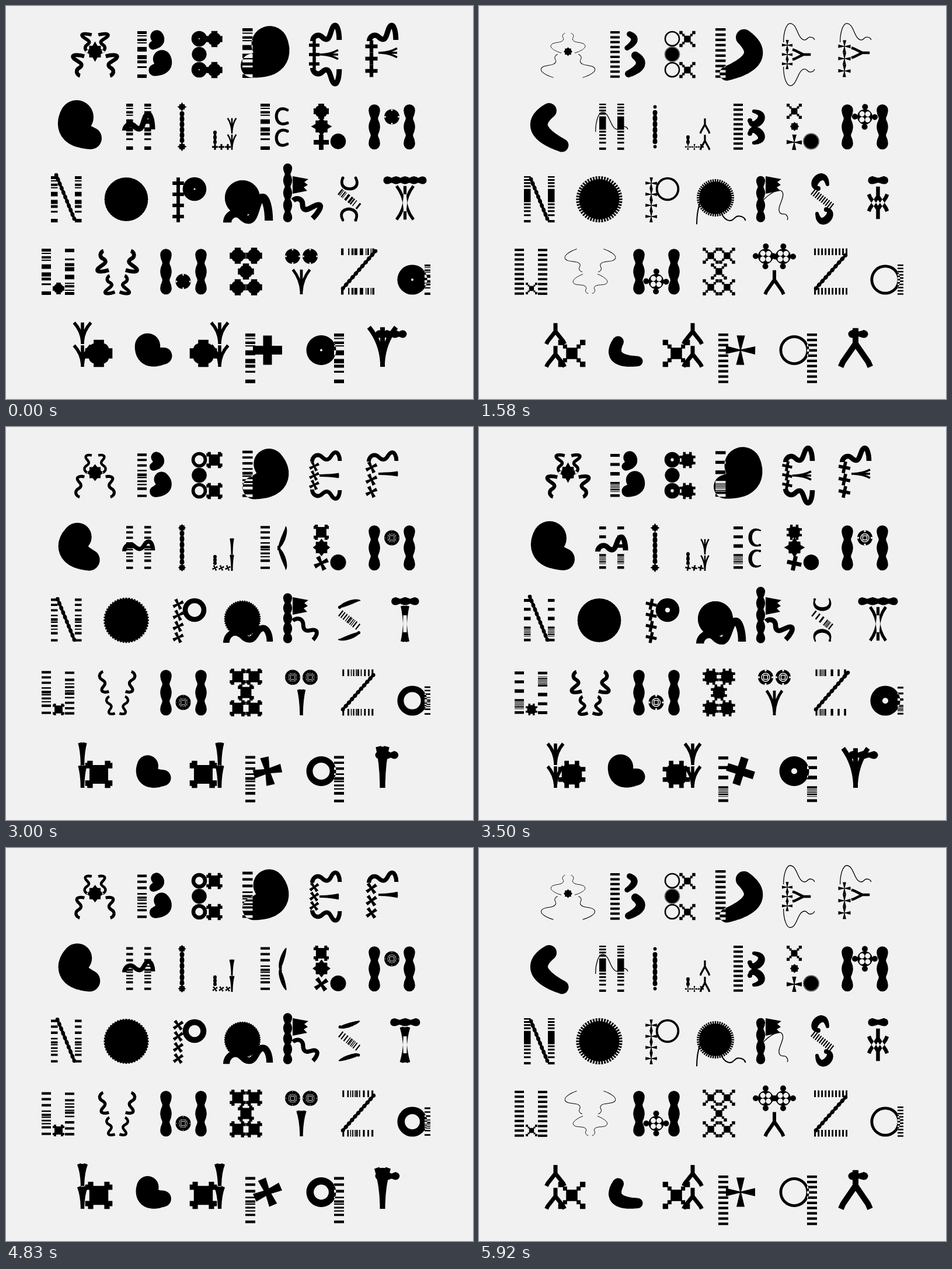
An HTML page with a canvas for the animation above (6 s loop, 800 px wide and 672 px high).

```html
<!DOCTYPE html>
<html lang="en">
<head>
<meta charset="utf-8">
<title>Morphing alphabet</title>
<style>
html, body { margin: 0; width: 100%; height: 100%; overflow: hidden; background: #f1f1f1; }
canvas { display: block; }
</style>
</head>
<body>
<canvas id="stage" width="800" height="672"></canvas>
<script>
const c = document.getElementById('stage').getContext('2d');
const PAPER = '#f1f1f1', TAU = Math.PI * 2;
const mix = (a, b, k) => a + (b - a) * k;

// Position along the five master poses, as [ms, pose].
const PATH = [[0, 0], [200, 1], [833, 2], [1160, 3], [1500, 4], [1790, 4.1], [2090, 4], [2420, 3],
  [2750, 2], [3500, 1], [3833, 0], [4167, 0], [4333, 1], [5250, 2], [5580, 3], [5917, 4], [6000, 4.1]];
let pose = 0;

function poseAt(t) {
  const i = PATH.findIndex(p => p[0] > t), [t0, a] = PATH[i - 1], [t1, b] = PATH[i];
  return mix(a, b, (t - t0) / (t1 - t0));
}
// Value of a five-master list at the current pose.
function v(list) {
  const i = Math.min(3, Math.floor(pose));
  return mix(list[i], list[i + 1], pose - i);
}
function at(x, y, s, deg, draw, flipX = 1, flipY = 1) {
  c.save();
  c.translate(x, y);
  c.scale(flipX * s, flipY * s);
  c.rotate(deg * Math.PI / 180);
  draw();
  c.restore();
}
function xor(draw) {
  c.globalCompositeOperation = 'xor';
  draw();
  c.globalCompositeOperation = 'source-over';
}
function dot(x, y, r) {
  c.moveTo(x + r, y);
  c.arc(x, y, Math.max(0, r), 0, TAU);
}
function disc(x, y, r, color = '#000') {
  c.fillStyle = color;
  c.beginPath();
  dot(x, y, r);
  c.fill();
  c.fillStyle = '#000';
}

// Barcodes, 80 units long: starts and widths.
const EVEN = [[0, 8.4, 16.8, 25.2, 33.6, 42, 50.4, 58.8, 67.2, 75.8], Array(10).fill(4)];
const BLOCK = [[0, 5, 10.5, 16, 22, 47, 53, 59, 66, 76], [2.5, 3, 3, 3, 23, 3, 3, 3, 3, 4]];
const LOOSE = [
  [[0, 7, 13, 19, 27, 33, 41, 50, 60, 74], [5, 2, 4, 2, 6, 2, 7, 5, 3, 6]],
  [[3, 18.5, 34, 51, 55.5, 58, 60.5, 63, 67, 72], [5, 5, 6, 3.5, 1.3, 1.3, 1.3, 2.5, 1, 4.5]],
  [[2, 8, 14, 20, 27, 34, 42, 50, 57, 73], [4, 3, 3, 2, 6, 3, 4, 2, 6, 4]]];
function bars(x, y, w, h, end = EVEN, deg = 0) {
  const set = [...LOOSE, end, end];
  at(x, y, 1, deg, () => {
    c.beginPath();
    for (let i = 0; i < 10; i++) {
      const a = v(set.map(p => p[0][i])), b = v(set.map(p => p[1][i]));
      c.rect(0, a * h / 80, w, b * h / 80);
    }
    c.fill();
  });
}

// Snake with two crests; baseline at y = 0, 54 units long.
function wave() {
  const w = v([9, 8.5, 6, 3, 1.3]), x0 = w / 2, x4 = 54.3 - w / 2,
    y0 = v([2, 2, 1, 2, 4]), y4 = 0,
    x1 = v([14, 14, 13, 11, 12]), y1 = v([-8, -8, -11, -20, -28]),
    x2 = v([28, 28, 29, 33, 37]), y2 = v([-1, -1, -3, -1, 0]),
    x3 = v([43, 43, 44, 45, 46]), y3 = v([-25, -22, -11, -6, -5]);
  const a = (x1 + x2) / 2, b = (x2 + x3) / 2;
  c.lineWidth = w;
  c.beginPath();
  c.moveTo(x0, y0);
  c.bezierCurveTo(x0, mix(y0, y1, .55), mix(x1, x0, .55), y1, x1, y1);
  c.bezierCurveTo(a, y1, a, y2, x2, y2);
  c.bezierCurveTo(b, y2, b, y3, x3, y3);
  c.bezierCurveTo(mix(x3, x4, .55), y3, x4, mix(y4, y3, .55), x4, y4);
  c.stroke();
}

// Kidney: union of circles swept along a curve.
function bean() {
  const p0 = [v([-6, -6, -4, -5, -7]), v([-14, -14, -17, -21, -25])],
    p1 = [v([-8.5, -8.5, -12, -19, -23]), v([8, 8, 6, 5, 5])],
    p2 = [v([18, 18, 14, 15, 15]), v([22, 22, 24, 30, 34])],
    r0 = v([29, 29, 22, 16, 13]), r1 = v([25, 25, 24, 18, 15]), r2 = v([19, 19, 18, 14, 11.5]);
  const bend = (a, m, b, k) => (1 - k) * (1 - 2 * k) * a + 4 * k * (1 - k) * m + k * (2 * k - 1) * b;
  c.beginPath();
  for (let k = 0; k <= 1.001; k += 1 / 60)
    dot(bend(p0[0], p1[0], p2[0], k), bend(p0[1], p1[1], p2[1], k), bend(r0, r1, r2, k));
  c.fill();
}

function gear(x, y, r) {
  disc(x, y, r * v([.94, .94, .94, .9, .87]));
  const out = r * v([.94, .94, 1, 1, 1]), inner = r * .83, n = 48;
  c.beginPath();
  for (let i = 0; i < n; i++) {
    const a = i * TAU / n, half = TAU / n * .3;
    for (const [q, d] of [[inner, -half], [out, -half], [out, half], [inner, half]])
      c[q === inner && d < 0 ? 'moveTo' : 'lineTo'](x + q * Math.cos(a + d), y + q * Math.sin(a + d));
  }
  c.fill();
}

function ring(x, y, r) {
  const hole = r * v([.08, .2, .76, .79, .81]);
  c.beginPath();
  dot(x, y, r);
  dot(x, y, hole);
  c.fill('evenodd');
}

// Square cog: the pair of teeth on each side slides apart into the corners.
function cog(x, y, s) {
  at(x, y, s, 0, () => {
    const b = v([.74, .74, .66, .5, .42]), k = v([.4, .33, .44, .42, .4]),
      o = v([.18, .38, .78, .79, .8]), link = v([0, 0, 0, .34, .3]);
    c.beginPath();
    c.roundRect(-b, -b, 2 * b, 2 * b, Math.max(0, v([.45, .45, 0, 0, 0])));
    for (const i of [-1, 1]) for (const j of [-1, 1]) {
      const m = 1 - k / 2;
      c.rect(i * o - k / 2, j * m - k / 2, k, k);
      c.rect(i * m - k / 2, j * o - k / 2, k, k);
      c.rect(i * .5 - link / 2, j * .5 - link / 2, link, link);
    }
    c.fill();
  });
}

function star(x, y, s) {
  const r = s * v([1, 1, .74, .48, .43]), diagonal = v([.8, .78, 1, 1, 1]), inner = v([.62, .62, .76, .76, .76]);
  c.beginPath();
  for (let i = 0; i < 16; i++) {
    const a = i * TAU / 16, q = r * (i % 2 ? inner : i % 4 ? diagonal : 1);
    c.lineTo(x + q * Math.cos(a), y + q * Math.sin(a));
  }
  c.fill();
}

function cross(x, y, s, extra = 0) {
  const deg = v([0, 12 + extra / 3, 90 + extra, 135, 180]);
  at(x, y, s * v([1, .96, .97, .8, 1]), deg, () => {
    const a = v([.3, .28, .14, .12, .05]), o = v([.3, .28, .32, .27, .28]);
    c.beginPath();
    for (let i = 0; i < 4; i++) {
      c.moveTo(0, -a);
      c.lineTo(a, -a);
      c.lineTo(1, -o);
      c.lineTo(1, o);
      c.lineTo(a, a);
      c.lineTo(0, a);
      c.rotate(TAU / 4);
    }
    c.rect(-a, -a, 2 * a, 2 * a);
    c.fill();
  });
}

function chain(x0, y0, x1, y1, r) {
  const len = Math.hypot(x1 - x0, y1 - y0), n = Math.max(1, Math.round(len / r / 2.5));
  c.beginPath();
  for (let i = 0; i <= 120; i++) {
    const k = i / 120;
    dot(mix(x0, x1, k), mix(y0, y1, k), r * (.82 + .18 * Math.cos(k * n * TAU)));
  }
  c.fill();
}

// Stick that branches at its tip or splits into legs at its base.
function tree(x, y, len, w, spread = 1, deg = 0) {
  at(x, y, 1, deg, () => {
    const tip = -len * v([.94, .94, 1, .95, .92]), up = len * spread * v([.37, .34, 0, 0, 0]),
      legs = len * spread * v([0, 0, 0, .24, .4]);
    c.lineWidth = w * v([.8, .8, 1, 1, 1]);
    c.beginPath();
    c.moveTo(0, legs > .3 ? -len * .5 : 0);
    c.lineTo(0, tip);
    for (const i of [-1, 1]) {
      if (up > .3) {
        c.moveTo(0, -len * .1);
        c.quadraticCurveTo(i * up * .1, tip * .62, i * up, tip);
      }
      if (legs > .3) {
        c.moveTo(i * legs, 0);
        c.lineTo(i * legs * .85, -len * .12);
        c.lineTo(0, -len * .55);
        c.lineTo(0, -len * .7);
      }
    }
    c.stroke();
  });
}

function flower(x, y) {
  at(x, y, 1, v([0, 0, 0, 45, 90]), () => {
    disc(0, 0, 13);
    for (let i = 0; i < 4; i++) {
      c.rotate(TAU / 4);
      disc(v([7, 7, 7, 14, 17]), 0, 5);
      disc(11.5, 0, v([1.5, 1.8, 0, 0, 0]), PAPER);
      const d = v([5, 5, 6, 6.4, 6.6]) / Math.SQRT2 * 1.05;
      disc(d, d, v([0, 0, .4, 4, 4.5]), PAPER);
    }
    const thin = 1 - Math.abs(pose - 2), square = 1 - Math.abs(pose - 1);
    c.strokeStyle = PAPER;
    if (thin > 0) {
      c.lineWidth = thin * .8;
      for (let i = 0; i < 4; i++) {
        c.rotate(TAU / 4);
        c.beginPath();
        c.arc(9, 0, 5, 1.8, 4.5);
        c.stroke();
      }
    }
    if (square > 0) {
      c.lineWidth = square * 1.5;
      c.beginPath();
      dot(0, 0, 7);
      c.rect(-3.5, -3.5, 7, 7);
      c.stroke();
    }
    c.strokeStyle = '#000';
  });
}

// Tapered curl with a ball terminal; the ball rests near the origin.
function curl() {
  const x0 = v([22, 21, 1, 1, 4]), y0 = v([-7, -5, 0, -8, -11]),
    x1 = v([-3, -1, 14, 12, 8]), y1 = v([4, 2, -4, 3, 8]),
    x2 = v([-3, -1, 32, 42, 42]), y2 = v([-42, -40, -22, -20, -22]),
    x3 = v([22, 22, 18, 14, 11]), y3 = v([-29, -30, -40, -29, -27]),
    thick = v([2.6, 3.2, 4, 5.5, 6.5]), thin = v([2.4, 1.2, .4, 2, 3]);
  const b = (p, q, r, s, k) => { const m = 1 - k; return m*m*m*p + 3*m*m*k*q + 3*m*k*k*r + k*k*k*s; };
  c.beginPath();
  for (let k = 0; k <= 1.001; k += 1 / 60)
    dot(b(x0, x1, x2, x3, k), b(y0, y1, y2, y3, k), mix(thin, thick, Math.sin(k * Math.PI)));
  dot(x0, y0, v([2.6, 2.2, 3, 3.5, 4]));
  c.fill();
}

function rowOne() {
  xor(() => {
    for (const side of [1, -1]) at(152.5, 0, 1, 0, () => {
      at(-14, 80, .64, -75, wave);
      at(-28, 122, .75, -75, wave);
    }, side);
    star(152.5, 78, 17.5);
  });

  bars(225, 43, 16, 80);
  at(257, 58, .38, 10, bean, -1);
  at(264, 98, .53, 0, bean, -1);

  for (const y of [56, 109]) {
    ring(331, y, 13.3);
    cog(357, y + .5, 13.7);
  }
  gear(331, 82.5, 13.3);

  xor(() => {
    bars(405, 38, 17.5, 85);
    at(444, 80, 1.08, -5, bean, -1);
  });

  at(521, 58, 1, 0, wave);
  at(521, 108, 1, 0, wave, 1, -1);
  for (const y of [67, 83, 99]) cross(528, y, 9);
  tree(537, 83, 34, 4.5, .62, 90);

  at(618, 58, 1, 0, wave);
  for (const y of [69, 90, 111]) cross(626, y, 10.5);
  tree(638, 80, 34, 4.5, .62, 90);
}

function rowTwo() {
  at(127, 204, 1, 0, bean);

  bars(206, 167, 11.5, 79, BLOCK);
  bars(237, 167, 11.5, 79, BLOCK);
  at(199, 211, 1.04, 0, wave);

  star(301.5, 172.5, 8);
  star(301.5, 240.5, 8);
  chain(301.5, v([184, 184, 180, 182, 182]), 301.5, v([230, 230, 232, 232, 232]), 4);

  chain(358, v([216, 217, 224, 224, 224]), 358, 233, 3);
  for (const x of [358, 369, 380]) cross(x, 241, 5);
  tree(387, 246, 28, 3.2, .7);
  tree(387, 218, 28, 3.2, .7);

  bars(436, 167, 16, 79);
  at(460, 207, 1, 0, curl);
  at(460, 207, 1, 0, curl, 1, -1);

  cog(540, 180, 13);
  star(540.5, 206, 18);
  cross(540, 233, 13);
  gear(569, 231.5, 14);

  chain(631, 178, 631, 235.5, 9.8);
  chain(691, 178, 691, 235.5, 9.8);
  flower(661, 189.5);
}

function rowThree() {
  bars(77, 291, 11.5, 79, BLOCK);
  bars(118, 291, 11.5, 79, BLOCK);
  chain(v([86, 87, 89, 89, 89]), v([289, 290, 296, 296, 296]), 117, 364, 3.3);

  gear(206, 330.5, 39.6);

  for (const y of [303, 322, 341, 360]) cross(295, y, 9.8);
  ring(323, 313, 20.3);

  gear(405, 328, 32);
  at(372, 367, 1.57, 0, wave);

  chain(482.5, v([277, 281, 297.5, 298.5, 298.5]), 482.5, 362, 7.7);
  c.beginPath();
  for (const [x, y] of [[491, 291], [518, 296], [511, 301], [517, 306], [510, 310], [516, 316], [491, 321]])
    c.lineTo(x, y);
  c.fill();
  at(490, 328, 1, 45, wave);

  for (const turn of [0, 180]) at(588, 330, 1, turn, () => {
    c.transform(0, -1, -1, 0, -18, -14);
    curl();
  });
  bars(568, 322, 12, 42, EVEN, -52);

  chain(v([653, 656, 672, 673, 673]), 298, v([714, 711, 696, 694.5, 694.5]), 298, 6.6);
  xor(() => {
    tree(683.5, 351, 46, 6.5, .85);
    tree(683.5, 322, 46, 6.5, .85, 180);
  });
}

function rowFour() {
  bars(61, 415, 16, 79);
  bars(117, 494, 16, 79, EVEN, 180);
  cog(90, 483, 10);

  for (const side of [1, -1]) at(190.5, 0, 1, 0, () => {
    at(-26, 416, .75, -72, wave, 1, -1);
    at(-15, 459, .64, -70, wave, 1, -1);
  }, side);

  chain(274, 425, 274, 483.5, 9.8);
  chain(334, 425, 334, 483.5, 9.8);
  flower(303.5, 471);

  for (const [x, y] of [[397, 427], [425, 427], [411, 454], [397, 481], [425, 481]]) cog(x, y, 13.7);

  flower(491, 428);
  flower(521, 428);
  tree(506, 493, 45, 6, .87);

  bars(631, 414.5, 11.5, 57, EVEN, 90);
  bars(631, 482, 11.5, 57, EVEN, 90);
  chain(577, 483, v([633, 632, 628, 628, 628]), v([419, 420, 426, 426, 426]), 3.3);

  xor(() => {
    ring(696, 468, 25.6);
    bars(717, 442, 10, 52);
  });
}

function rowFive() {
  for (const [stem, body] of [[131, 159], [366, 338]]) {
    tree(stem, 617, 39, 7);
    tree(stem, 578, 39, 7);
    cog(body, 594, 23.3);
  }
  at(251, 589, .75, -25, bean);

  bars(410, 560, 17, 85);
  cross(448, 588.5, 25, 17);

  xor(() => {
    ring(540, 588.5, 25.5);
    bars(562, 560, 17, 85);
  });

  tree(645, 617, 72, 10, .87);
  chain(639, 561, v([680, 677, 660, 660, 660]), 561, 6.5);
}

function frame() {
  const step = 1000 / 12, t = performance.now() % 6000;
  pose = poseAt(Math.min(71, Math.floor((t + 5) / step)) * step);
  c.clearRect(0, 0, 800, 672);
  for (const row of [rowOne, rowTwo, rowThree, rowFour, rowFive]) row();
  requestAnimationFrame(frame);
}
requestAnimationFrame(frame);
</script>
</body>
</html>
```
